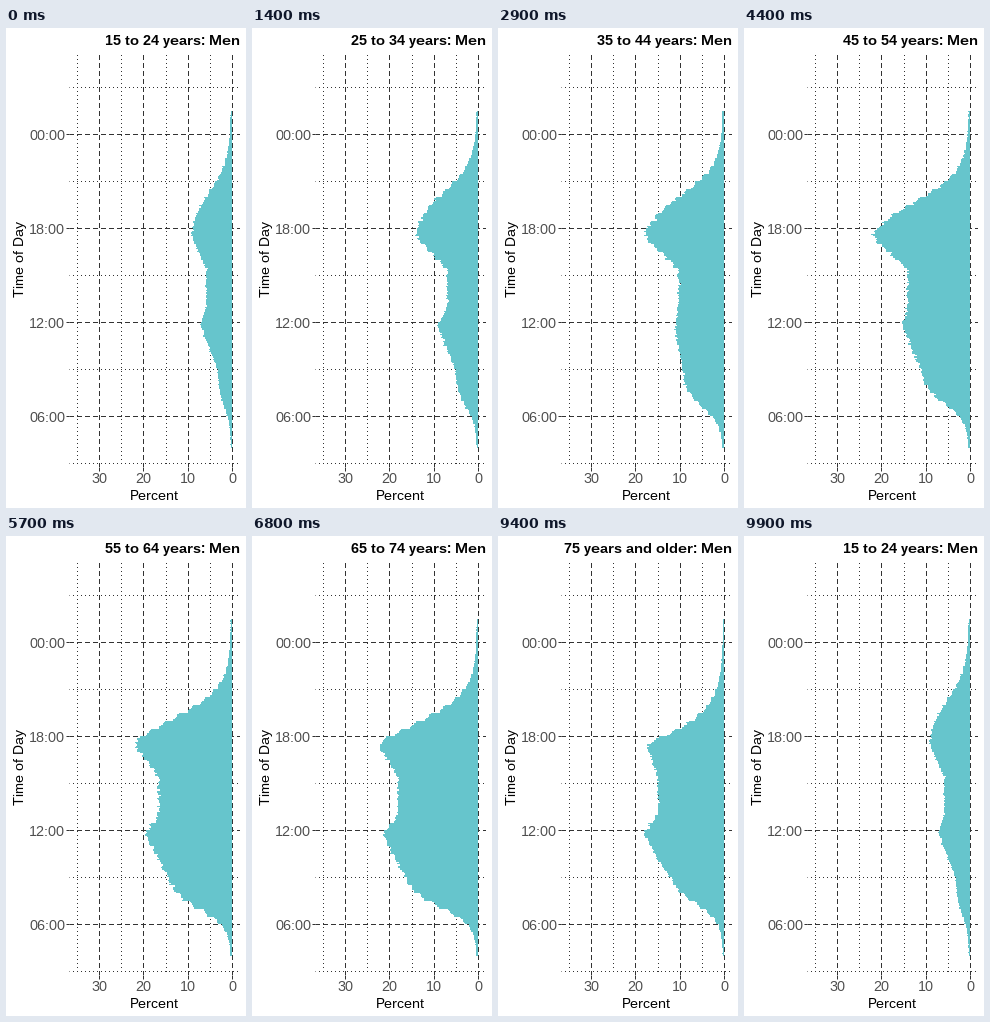
Write a matplotlib script that moves like this. It is 240x480 px and loops after 10000 ms.

```python
import numpy as np
import matplotlib.pyplot as plt
from matplotlib.animation import FuncAnimation

W, H = 240, 480
FRAMES, INTERVAL = 100, 100
STEPS = 6
CHANGES = [9, 24, 39, 52, 66, 80, 94]  # first frame of each transition

TEAL, INK, GREY = "#66C5CC", "#333333", "#4D4D4D"
plt.rcParams.update({
    "font.family": "Liberation Sans",
    "font.size": 14,
    "text.hinting": "default",
    "text.hinting_factor": 1,
})

# Five-minute bars from 04:00 to 04:00; hours from 24 are the next day.
EDGES = np.linspace(4, 28, 289)
CENTRES = (EDGES[:-1] + EDGES[1:]) / 2
EVENING = 17.5
rng = np.random.default_rng(4)

# Percent in the morning, at noon, in the afternoon and at the evening peak.
LEVELS = [
    (3, 6.9, 5.5, 8.9),
    (4.9, 9, 6.7, 14),
    (9.2, 10.8, 10, 17.8),
    (11, 15, 13.8, 22),
    (14.5, 19.2, 16.2, 22),
    (18.8, 23, 19.3, 22.6),
    (14.5, 20, 16.5, 19),
]


def logistic(x):
    return 1 / (1 + np.exp(-x))


def day_curve(hours, group):
    """Key levels over the day; older groups start later and stop earlier."""
    morning, noon, afternoon, peak = LEVELS[group]
    level = np.interp(hours, [9, 11.8, 13, 15.4, EVENING],
                      [morning, noon, afternoon, afternoon, peak])
    wake = 6.6 + 0.2 * max(0, group - 2)
    stop = 20.4 - 0.08 * group ** 2
    rise = logistic((hours - wake) / 0.6)
    fall = np.minimum(1, logistic(stop - hours) / logistic(stop - EVENING))
    return level * rise * fall + 0.3


def profile(group):
    """Blend the smooth curve with half-hour steps and a little noise."""
    half_hours = np.floor(CENTRES * 2) / 2 + 0.25
    curve = (day_curve(CENTRES, group) + day_curve(half_hours, group)) / 2
    curve += 0.05 * np.sqrt(curve) * rng.standard_normal(curve.size)
    return np.where(CENTRES < 25.5, curve, 0)


def label(group):
    if group == len(LEVELS) - 1:
        return "75 years and older: Men"
    start = 15 + 10 * group
    return f"{start} to {start + 9} years: Men"


profiles = [profile(g) for g in range(len(LEVELS))]

fig = plt.figure(figsize=(W / 72, H / 72), dpi=72, facecolor="white")

# Panel in pixels, measured from the top left.
LEFT, TOP, WIDTH, HEIGHT = 63, 25, 171, 413.5
ax = fig.add_axes([LEFT / W, 1 - (TOP + HEIGHT) / H, WIDTH / W, HEIGHT / H])
ax.set_xlim(-36.75, 1.75)
ax.set_ylim(2.8, 29.2)
ax.set_axisbelow(True)
ax.spines[:].set_visible(False)
ax.set_xticks(range(-30, 1, 10))
ax.set_xticks(range(-35, 0, 10), minor=True)
ax.set_yticks(range(6, 25, 6))
ax.set_yticks(range(3, 28, 6), minor=True)
ax.tick_params(which="major", length=3.5, width=1, color=INK,
               labelleft=False, labelbottom=False)
ax.tick_params(which="minor", length=0)
# The half-pixel offset keeps dashes on whole pixels.
ax.grid(which="major", color=INK, lw=1, ls=(0.5, (5, 3)))
ax.grid(which="minor", color=INK, lw=1, ls=(0.5, (1, 3)))


def put_text(x, y, text, **style):
    return fig.text(x / W, 1 - y / H, text, va="baseline", **style)


for pct in range(0, 31, 10):
    x = LEFT + (36.75 - pct) / 38.5 * WIDTH
    put_text(x, 455, str(pct), ha="center", color=GREY)
for hour in range(6, 25, 6):
    y = TOP + (29.2 - hour) / 26.4 * HEIGHT
    put_text(59, y + 6, f"{hour % 24:02d}:00", ha="right", color=GREY)
put_text(148, 472, "Percent", ha="center")
put_text(18, 231, "Time of Day", ha="center", rotation=90,
         rotation_mode="anchor")
title = put_text(234, 17, label(0), ha="right", weight="bold")
bars = ax.stairs(-profiles[0], EDGES, orientation="horizontal", fill=True,
                 color=TEAL, lw=0)


def draw(frame):
    shape, shown = profiles[0], 0
    for group, start in enumerate(CHANGES):
        if frame < start:
            break
        following = (group + 1) % len(profiles)
        mix = min(frame - start + 1, STEPS) / STEPS
        shape = (1 - mix) * profiles[group] + mix * profiles[following]
        shown = following if mix >= 0.5 else group
    bars.set_data(values=-shape)
    title.set_text(label(shown))
    return bars, title


anim = FuncAnimation(fig, draw, frames=FRAMES, interval=INTERVAL,
                     repeat=True, repeat_delay=0)
plt.show()
```
